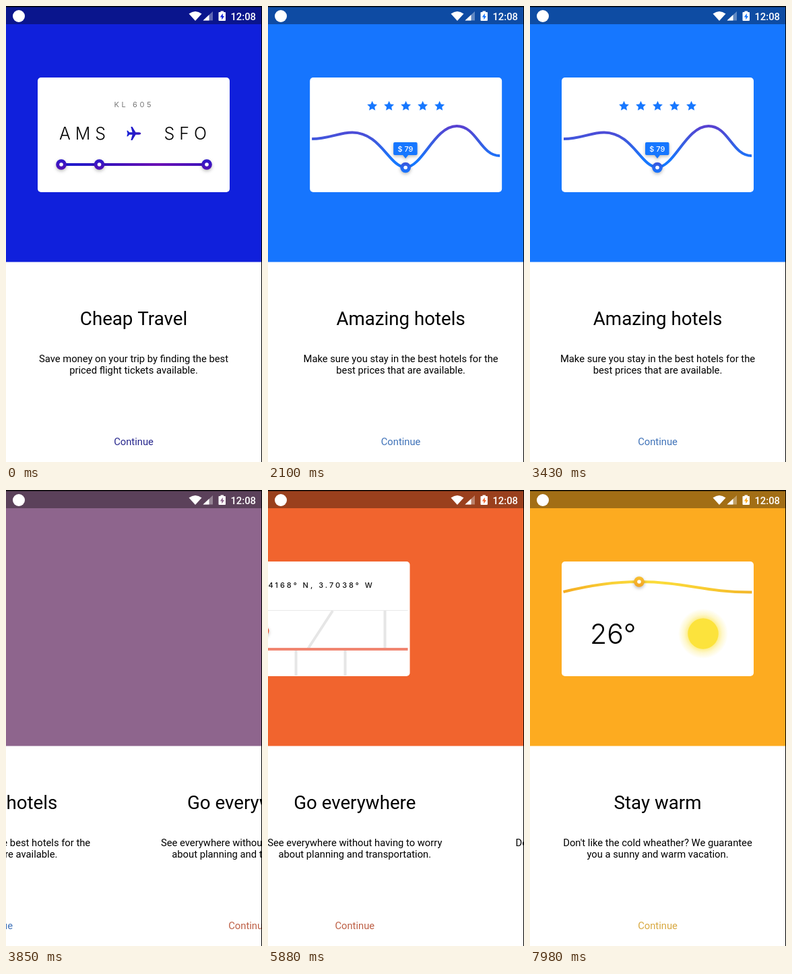
Write an HTML page with a canvas that moves like this. It is 380 by 676 pixels and loops after 8 s.

```html
<!DOCTYPE html>
<html lang="en">
<head>
<meta charset="utf-8">
<title>Travel onboarding</title>
<style>
html, body { margin: 0; width: 100%; height: 100%; overflow: hidden; background: #fff; }
canvas { display: block; width: 380px; height: 676px; }
</style>
</head>
<body>
<canvas id="stage" width="380" height="676"></canvas>
<script>
const ctx = document.getElementById('stage').getContext('2d');
const LOOP = 8000, PAGE = 379, MID = 189.5;
const DRAG = 260, SETTLE = 700, RELEASE = 0.42;
const SWIPES = [1498, 3556, 5710];
const UI = 'Roboto, sans-serif';
const ART = 'Inter, "Open Sans", sans-serif';

const pages = [
  { bg: [16, 32, 220], button: '#26268c', title: 'Cheap Travel', art: ticket,
    lines: ['Save money on your trip by finding the best', 'priced flight tickets available.'] },
  { bg: [22, 119, 255], button: '#3f72b8', title: 'Amazing hotels', art: hotel,
    lines: ['Make sure you stay in the best hotels for the', 'best prices that are available.'] },
  { bg: [239, 86, 49], button: '#bd5f45', title: 'Go everywhere', art: map,
    lines: ['See everywhere without having to worry', 'about planning and transportation.'] },
  { bg: [253, 171, 32], button: '#d8a840', title: 'Stay warm', art: weather,
    lines: ["Don't like the cold wheather? We guarantee", 'you a sunny and warm vacation.'] }
];

// Finger drag, then a quintic settle after release.
function swipe(t) {
  if (t <= 0) return 0;
  if (t < DRAG) return RELEASE * (t / DRAG) ** 2.3;
  const v = Math.min(1, (t - DRAG) / SETTLE);
  return 1 - (1 - RELEASE) * (1 - v) ** 5;
}

function background(pos) {
  const i = Math.min(Math.floor(pos), pages.length - 2), k = pos - i;
  const mix = pages[i].bg.map((c, n) => Math.round(c + (pages[i + 1].bg[n] - c) * k));
  return `rgb(${mix})`;
}

function text(str, x, y, font, color, align = 'center', spacing = 0) {
  ctx.font = font;
  ctx.fillStyle = color;
  ctx.textAlign = align;
  ctx.letterSpacing = spacing + 'px';
  ctx.fillText(str, x, y);
}

function ramp(x0, y0, x1, y1, ...colors) {
  const g = ctx.createLinearGradient(x0, y0, x1, y1);
  colors.forEach((c, i) => g.addColorStop(i / (colors.length - 1), c));
  return g;
}

function fill(d, color) {
  ctx.fillStyle = color;
  ctx.fill(new Path2D(d));
}

function stroke(d, color, width = 4) {
  ctx.strokeStyle = color;
  ctx.lineWidth = width;
  ctx.stroke(new Path2D(d));
}

function disc(x, y, r, color) {
  ctx.fillStyle = color;
  ctx.beginPath();
  ctx.arc(x, y, r, 0, Math.PI * 2);
  ctx.fill();
}

function box(x, y, w, h, r, color) {
  ctx.fillStyle = color;
  ctx.beginPath();
  ctx.roundRect(x, y, w, h, r);
  ctx.fill();
}

function shadowed(draw) {
  ctx.save();
  ctx.shadowColor = 'rgba(0,0,0,.28)';
  ctx.shadowBlur = 5;
  ctx.shadowOffsetY = 2;
  draw();
  ctx.restore();
}

function marker(x, y, top, bottom) {
  shadowed(() => disc(x, y, 7.8, ramp(0, y - 8, 0, y + 8, top, bottom)));
  disc(x, y, 2.8, '#fff');
}

function ticket() {
  text('KL 605', 160.5, 150, `400 11px ${ART}`, '#777', 'left', 3.6);
  text('AMS', 79, 198, `300 25px ${ART}`, '#000', 'left', 7);
  text('SFO', 234.5, 198, `300 25px ${ART}`, '#000', 'left', 7);
  fill('M200.5 189 Q200 187.3 197.5 187.3 L192.5 187.3 L187.5 179 L185.3 179 L187.6 187.3 ' +
    'L183 187.3 L181 184.8 L179.3 184.8 L180.5 189 L179.3 193.2 L181 193.2 L183 190.7 ' +
    'L187.6 190.7 L185.3 199 L187.5 199 L192.5 190.7 L197.5 190.7 Q200 190.7 200.5 189 Z',
    ramp(179, 0, 201, 0, '#1420d8', '#3a14b8'));
  stroke('M82 235 H298', ramp(82, 0, 298, 0, '#1a1cd0', '#3a12bc', '#6a0cb4', '#3c12bc'));
  for (const x of [82, 138.5, 298]) marker(x, 235, '#2a18cc', '#5510b4');
}

function star(x, y, r) {
  ctx.beginPath();
  for (let i = 0; i < 10; i++) {
    const a = i * Math.PI / 5 - Math.PI / 2, q = i % 2 ? r * 0.48 : r;
    ctx.lineTo(x + q * Math.cos(a), y + q * Math.sin(a));
  }
  ctx.closePath();
  ctx.fill();
}

function hotel() {
  ctx.fillStyle = '#1677ff';
  for (let i = 0; i < 5; i++) star(139.5 + 25 * i, 148.5, 7.8);
  stroke('M50 197 C75 197 90 187.5 110 187.5 C152 187.5 165 239 189 239 ' +
    'C214 239 232 178 265 178 C295 178 300 222 329 222',
    ramp(0, 176, 0, 228, '#5a3fd0', '#3a5ce0', '#1677ff'));
  marker(189, 239.5, '#3b55dc', '#1677ff');
  shadowed(() => {
    fill('M173 202 H204.500 Q206.500 202 206.500 204 V219 Q206.500 221 204.500 221 H193 L189 226 L185 221 ' +
      'H173 Q171 221 171 219 V204 Q171 202 173 202 Z', '#1677ff');
  });
  text('$ 79', 188.8, 215.5, `500 11px ${ART}`, '#fff');
}

function map() {
  const road = '#e6e6e6';
  text('40.4168° N, 3.7038° W', 95.5, 145, `500 11px ${ART}`, '#111', 'left', 3);
  stroke('M50 178.500 H329', '#e9e9e9', 1);
  stroke('M115 179 V275 M50 236 H115 M295 179 V236 M163 236 V275 M236 236 V275 M217.500 179 L181 235', road);
  stroke('M115 210 V236 H329', '#f08570');
  marker(115, 209, '#ef5631', '#e84e34');
}

function weather() {
  stroke('M49.500 151 C90 141 125 136 162 136 C230 136 260 152 329.500 151.500',
    ramp(50, 0, 330, 0, '#f5ac22', '#f9d035', '#fbdc3a', '#f9cc32', '#f3b62a'));
  marker(162, 136, '#f9c232', '#f2a222');
  text('26°', 89, 228, `300 41px ${ART}`, '#000', 'left');
  const glow = ctx.createRadialGradient(257, 213, 20, 257, 213, 37);
  glow.addColorStop(0, 'rgba(252,226,60,.75)');
  glow.addColorStop(0.5, 'rgba(252,230,90,.3)');
  glow.addColorStop(1, 'rgba(252,230,90,0)');
  disc(257, 213, 37, glow);
  disc(257, 213, 22.7, '#fce33c');
}

function statusBar(bg) {
  ctx.fillStyle = 'rgba(0,0,0,.36)';
  ctx.fillRect(0, 0, 380, 27);
  disc(19, 15, 9, '#fff');
  fill('M271.500 11.500 Q281 4.500 290.500 11.500 L281 22 Z', '#fff');
  fill('M307 8 V21.500 H292.500 Z', 'rgba(255,255,255,.35)');
  fill('M301.500 13.100 V21.500 H292.500 Z', '#fff');
  box(315.5, 9, 10.5, 13, 1, '#fff');
  box(318.5, 7.5, 4.5, 3, 0, '#fff');
  fill('M321.800 11 L317.800 16.500 H320.300 V20.500 L324 15 H321.800 Z', bg);
  text('12:08', 371, 20.5, `500 14.8px ${UI}`, '#fff', 'right');
}

function drawPage(page, offset) {
  if (Math.abs(offset) >= 1) return;
  ctx.save();
  ctx.translate(offset * PAGE * 2, 0);
  box(47, 106, 285, 170, 5, '#fff');
  page.art();
  ctx.restore();

  ctx.save();
  ctx.translate(offset * PAGE, 0);
  text(page.title, MID, 473, `400 27.7px ${UI}`, '#000');
  page.lines.forEach((line, i) => text(line, MID, 528 + i * 17.4, `400 14.77px ${UI}`, '#000'));
  text('Continue', MID, 651, `400 14.77px ${UI}`, page.button);
  ctx.restore();
}

function render(t) {
  const pos = SWIPES.reduce((sum, start) => sum + swipe(t - start), 0);
  const bg = background(pos);
  ctx.fillStyle = '#fff';
  ctx.fillRect(0, 0, 380, 676);
  ctx.fillStyle = bg;
  ctx.fillRect(0, 0, 380, 379.5);
  pages.forEach((page, i) => drawPage(page, i - pos));
  statusBar(bg);
  ctx.fillStyle = '#000';
  ctx.fillRect(0, 0, 380, 1.5);
  ctx.fillRect(379, 0, 1, 676);
}

const start = performance.now();
function tick() {
  render((performance.now() - start) % LOOP);
  requestAnimationFrame(tick);
}
tick();
</script>
</body>
</html>
```
